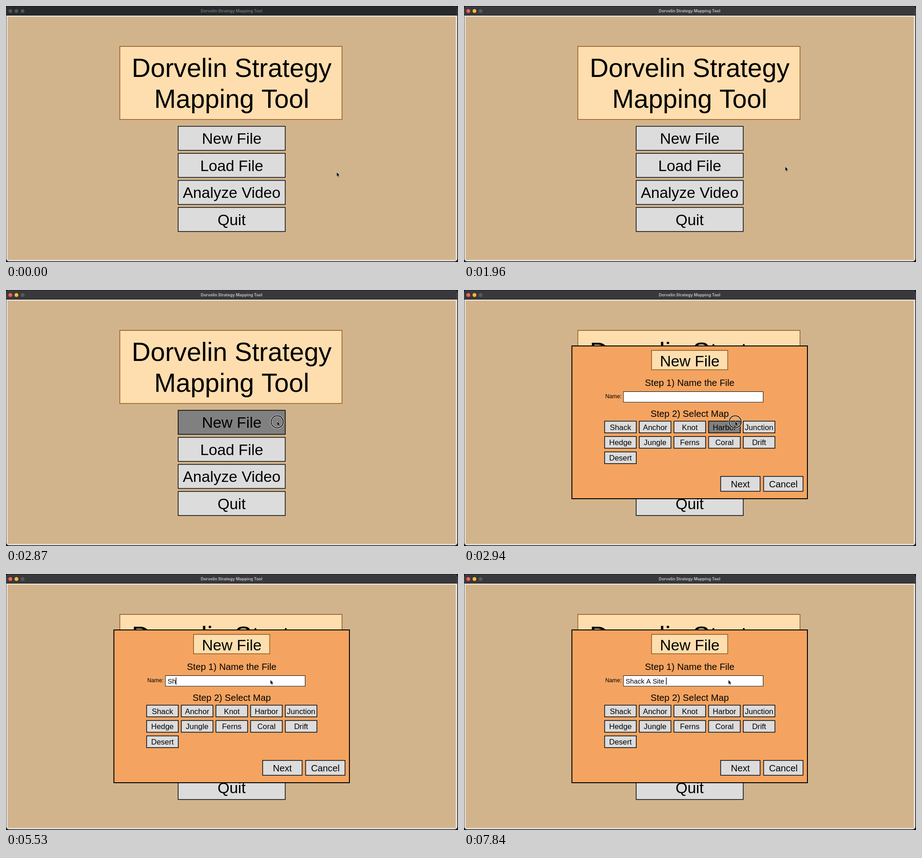
An HTML page with a canvas for the animation above (8 s loop, 995 by 563 pixels).

```html
<!DOCTYPE html>
<html lang="en">
<head>
<meta charset="utf-8">
<title>Strategy Mapping Tool</title>
<style>
  html, body { margin: 0; width: 100%; height: 100%; overflow: hidden; background: #10182b; }
  canvas { display: block; }
</style>
</head>
<body>
<canvas id="stage" width="995" height="563"></canvas>
<script>
const ctx = document.getElementById('stage').getContext('2d');
const LOOP = 8000, STEP = 70;
const SANS = '"Liberation Sans", Arial, sans-serif';
const TAN = '#d2b48c', CREAM = '#fedeae', BROWN = '#8b4f14', GREY = '#dcdcdc', DARK = '#808080';
const MID = 496.8;
const UNIT = 0.675; // screen pixels per app pixel, for font sizes

const APP = 'Dorvelin Strategy Mapping Tool';
const MENU = ['New File', 'Load File', 'Analyze Video', 'Quit'];
const MAPS = ['Shack', 'Anchor', 'Knot', 'Harbor', 'Junction',
              'Hedge', 'Jungle', 'Ferns', 'Coral', 'Drift', 'Desert'];
const TYPED = 'Shack A Site ';

// Time, characters typed, caret visible
const KEYS = [
  [4620, 0, 1], [5110, 0, 0], [5250, 0, 1], [5390, 1, 1], [5530, 2, 1], [5670, 3, 1],
  [5740, 3, 0], [5880, 4, 1], [6090, 5, 1], [6160, 6, 1], [6230, 6, 0], [6580, 7, 1],
  [6720, 7, 0], [6930, 8, 1], [7140, 9, 1], [7210, 9, 0], [7280, 10, 1], [7560, 11, 1],
  [7630, 12, 1], [7770, 12, 0], [7840, 13, 1]
];

const between = (t, from, to) => t >= from && t < to;
const easeOut = u => 1 - (1 - u) ** 2;
const easeInOut = u => u * u * (3 - 2 * u);
const mix = (a, b, p) => a.map((v, i) => v + (b[i] - v) * p);

// Progress of a move that advances once per screen refresh
function progress(t, start, count) {
  return Math.min(count, Math.max(0, Math.floor((t - start) / STEP) + 1)) / count;
}

function pointer(t) {
  const menu = [597, 289], field = [582, 233];
  return t < 3290
    ? mix([728, 365.5], menu, easeOut(progress(t, 1960, 12)))
    : mix(menu, field, easeInOut(progress(t, 3290, 10)));
}

function box(x, y, w, h, fill, line = '#000', width = 1.5) {
  ctx.fillStyle = fill;
  ctx.fillRect(x, y, w, h);
  ctx.strokeStyle = line;
  ctx.lineWidth = width;
  ctx.strokeRect(x + width / 2, y + width / 2, w - width, h - width);
}

function label(text, points, x, y, align = 'center') {
  const size = points * UNIT;
  ctx.font = `${size}px ${SANS}`;
  ctx.textAlign = align;
  ctx.fillStyle = '#000';
  ctx.fillText(text, x, y + size * 0.358);
}

function button(text, points, x, y, w, h, mouse) {
  const over = mouse[0] > x && mouse[0] < x + w && mouse[1] > y && mouse[1] < y + h;
  box(x, y, w, h, over ? DARK : GREY);
  label(text, points, x + w / 2, y + h / 2 + 0.2);
}

function disc(x, y, r, fill) {
  ctx.fillStyle = fill;
  ctx.beginPath();
  ctx.arc(x, y, r, 0, Math.PI * 2);
  ctx.fill();
}

function drawWindow(active) {
  ctx.fillStyle = '#10182b';
  ctx.fillRect(0, 0, 995, 563);
  ctx.save();
  ctx.beginPath();
  ctx.roundRect(0.7, 1, 992.8, 560.6, 6);
  ctx.clip();
  ctx.fillStyle = '#ebe4dc';
  ctx.fillRect(0, 0, 995, 563);
  ctx.fillStyle = active ? '#39393b' : '#262a2b';
  ctx.fillRect(0, 0, 995, 21);
  ctx.fillStyle = '#19191a';
  ctx.fillRect(0, 20, 995, 1);
  ctx.fillStyle = TAN;
  ctx.fillRect(3.5, 23.5, 986.5, 535);
  ctx.restore();

  const lights = active ? ['#fe5f57', '#febc2e', '#59595b'] : ['#515354', '#515354', '#515354'];
  lights.forEach((c, i) => disc(9.5 + i * 13.5, 11, 4.2, c));
  ctx.font = 'bold 8.8px Inter, sans-serif';
  ctx.textAlign = 'center';
  ctx.fillStyle = active ? '#b8b8ba' : '#6c6e6f';
  ctx.fillText(APP, 496.5, 14);
}

function drawMenu(mouse) {
  box(249.8, 88, 490.6, 162.3, CREAM, BROWN);
  label('Dorvelin Strategy', 85, MID, 135.2);
  label('Mapping Tool', 85, MID, 203.2);
  MENU.forEach((text, i) => button(text, 50, 378.2, 263.8 + i * 59.5, 237.2, 54.4, mouse));
}

function drawDialog(t, mouse) {
  box(236.5, 122, 520.5, 338, '#f4a460', '#000', 2);
  box(412, 132, 169.3, 44.2, CREAM, BROWN);
  label('New File', 50, MID, 156);
  label('Step 1) Name the File', 30, MID, 203.5);
  label('Name:', 18, 346.8, 234, 'right');
  box(350.5, 223, 308.5, 24.3, '#fff', '#000', 1);
  label('Step 2) Select Map', 30, MID, 271.3);
  MAPS.forEach((text, i) =>
    button(text, 25, 308.8 + (i % 5) * 76.3, 287.7 + Math.floor(i / 5) * 33.8, 71.2, 27.2, mouse));
  button('Next', 30, 564.2, 409.2, 88.3, 34.2, mouse);
  button('Cancel', 30, 658.8, 409.2, 88.3, 34.2, mouse);
  drawEntry(t);
}

function drawEntry(t) {
  const key = KEYS.filter(k => k[0] <= t).pop();
  if (!key) return;
  const text = TYPED.slice(0, key[1]);
  label(text, 22, 355.8, 235.2, 'left');
  if (key[2]) ctx.fillRect(355.5 + ctx.measureText(text).width, 227.5, 1.4, 16);
}

function drawRing(x, y) {
  ctx.beginPath();
  ctx.arc(x, y, 13.3, 0, Math.PI * 2);
  ctx.strokeStyle = 'rgba(255,255,255,.8)';
  ctx.lineWidth = 3.6;
  ctx.stroke();
  ctx.strokeStyle = '#000';
  ctx.lineWidth = 1.8;
  ctx.stroke();
}

function drawPointer([x, y]) {
  ctx.save();
  ctx.translate(x, y);
  ctx.scale(0.9, 0.9);
  const arrow = new Path2D('M.4 .6V9.8L2.5 7.9L3.9 11.1L5.4 10.4L4 7.3L6.8 7.1Z');
  ctx.shadowColor = 'rgba(0,0,0,.25)';
  ctx.shadowBlur = 2;
  ctx.shadowOffsetY = 1;
  ctx.strokeStyle = '#e8e8e8';
  ctx.lineWidth = 1.2;
  ctx.stroke(arrow);
  ctx.shadowColor = 'transparent';
  ctx.fillStyle = '#000';
  ctx.fill(arrow);
  ctx.restore();
}

function draw(t) {
  const mouse = pointer(t), dialog = t >= 2940;
  drawWindow(t >= 1400);
  drawMenu(dialog ? [0, 0] : mouse);
  if (dialog) drawDialog(t, mouse);
  if (between(t, 2870, 3080) || between(t, 4060, 4200)) drawRing(mouse[0], mouse[1] + 1);
  if (!between(t, 1190, 1610)) drawPointer(mouse);
}

function tick() {
  draw(performance.now() % LOOP);
  requestAnimationFrame(tick);
}
tick();
</script>
</body>
</html>
```
